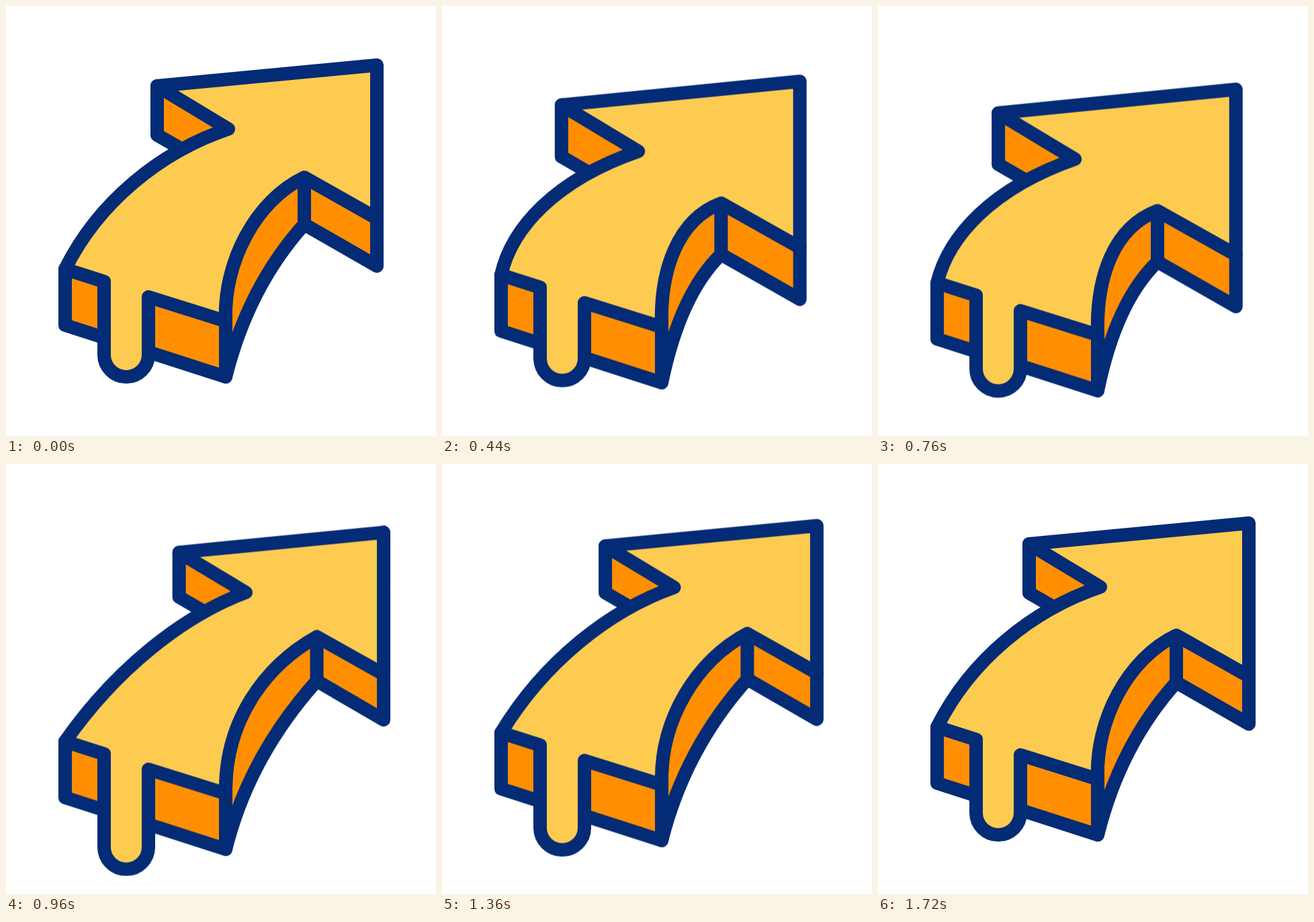
These frames come from a looping animation (640 by 640 pixels, 1.76 s). An HTML page without scripts:

```html
<!DOCTYPE html>
<html lang="en">
<head>
<meta charset="utf-8">
<title>Dripping arrow</title>
<style>
  html, body { margin: 0; height: 100%; overflow: hidden; background: #fff; }
  svg { display: block; width: 100vw; height: 100vh; }
  path { fill: #ff8f00; stroke: #042b76; stroke-width: 20; stroke-linecap: round; stroke-linejoin: round; }

  .arrow, .barb, .wall, .face {
    animation: 1760ms cubic-bezier(.55, 0, .45, 1) infinite;
  }
  .arrow { animation-name: sink; }
  .barb { animation-name: barb; }
  .wall { animation-name: wall; }
  .face { animation-name: face; fill: #fdcb50; }

  @keyframes sink {
    0%, 2.27%, 97.73%, 100% { transform: translateY(0); }
    52.27% { transform: translateY(21.5px); }
  }

  /* Rest, pulled back, stretched forward */
  @keyframes barb {
    0%, 2.27%, 90.91%, 100% { d: path("M225 119V192l45 26L331 183Z"); }
    36.36% { d: path("M167.3 143V221l45 26L283.5 213Z"); }
    61.36% { d: path("M269 106V171l45 26L366.2 164.3Z"); }
  }
  @keyframes wall {
    0%, 2.27%, 90.91%, 100% {
      d: path("M327 469V552C350 460 390 385 444 325L552 387V316L444 255V325V255C372 289 323 382 327 469Z");
    }
    36.36% {
      d: path("M327 469V552C344 466 371 404 409 369L528.3 437V358.5L409 291.5V369V291.5C346 313 324 386 327 469Z");
    }
    61.36% {
      d: path("M327 469V552C352 454 401 370 469.3 293L566.3 349.6V283L469.3 228.6V293V228.6C390 275 325 358 327 469Z");
    }
  }
  @keyframes face {
    0%, 2.27%, 90.91%, 100% {
      d: path("M88 391.5C138 291 230 217 331 183L225 119L552 88V316L444 255C372 289 323 382 327 469L212 433V519a33 33 0 0 1 -66 0V410Z");
    }
    36.36% {
      d: path("M88 391.5C96 329 154 258 283.5 213L167.3 143L528.3 107V358.5L409 291.5C346 313 324 386 327 469L212 433V515a33 33 0 0 1 -66 0V410Z");
    }
    61.36% {
      d: path("M88 391.5C172 278 277 198 366.2 164.3L269 106L566.3 77V283L469.3 228.6C390 275 325 358 327 469L212 433V553a33 33 0 0 1 -66 0V410Z");
    }
  }
</style>
</head>
<body>
<svg viewBox="0 0 640 640">
  <g class="arrow">
    <path class="barb" d="M225 119V192l45 26L331 183Z"/>
    <path d="M88 391.5V475L327 552V469Z"/>
    <path class="wall" d="M327 469V552C350 460 390 385 444 325L552 387V316L444 255V325V255C372 289 323 382 327 469Z"/>
    <path class="face" d="M88 391.5C138 291 230 217 331 183L225 119L552 88V316L444 255C372 289 323 382 327 469L212 433V519a33 33 0 0 1 -66 0V410Z"/>
  </g>
</svg>
</body>
</html>
```
